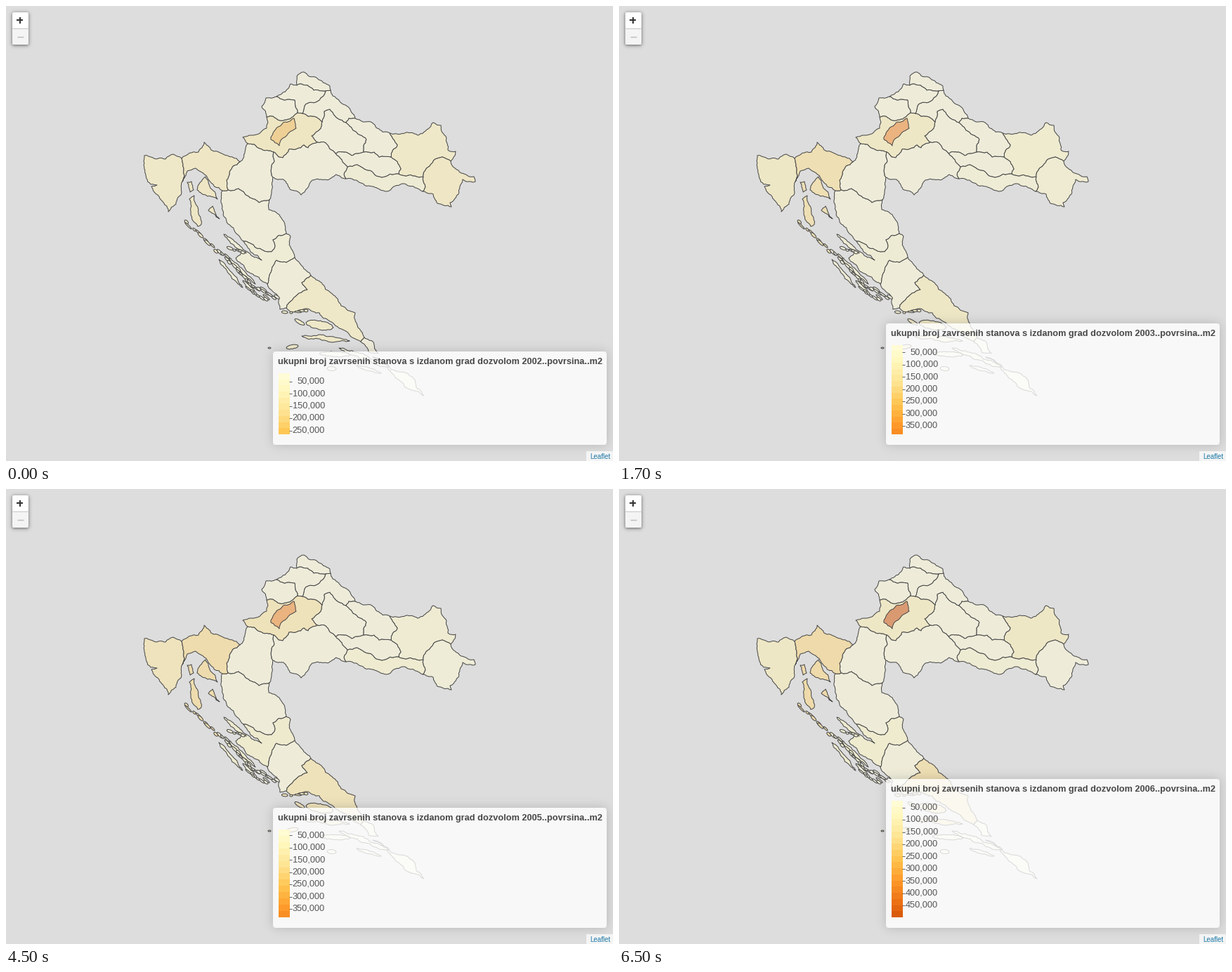
These frames come from a looping animation (864x648 px, 8 s). A matplotlib script:

```python
import random
import numpy as np
import matplotlib.pyplot as plt
from matplotlib.animation import FuncAnimation
from matplotlib.colors import to_rgb
from matplotlib.patches import FancyBboxPatch, Polygon, Rectangle

W, H = 864, 648
GREY = np.array(to_rgb("#dddddd"))
RAMP = np.array([to_rgb(c) for c in (
    "#ffffe5", "#fff7bc", "#fee391", "#fec44f", "#fe9929",
    "#ec7014", "#cc4c02", "#993404", "#662506")])
BAR_BOTTOM, STEP = 610, 17.42           # STEP is pixels per 50 thousand

# thousands of square metres, 2002 to 2006; all other counties stay near USUAL
LOWEST = (17, 21, 27, 27, 24)
HIGHEST = (267, 386, 328, 386, 500)
USUAL = (35,) * 5
VALUES = {
    "City": HIGHEST,
    "Istria": (105, 118, 118, 150, 118),
    "Primorje": (122, 182, 185, 200, 210),
    "County": (125, 112, 98, 157, 112),
    "Split": (105, 115, 185, 157, 185),
    "Osijek": (105, 75, 85, 65, 112),
    "Vukovar": (120, 65, 45, 45, 36),
    "Zadar": (50, 55, 72, 82, 75),
    "Brod": (55, 50, 70, 68, 60),
}
borders, shapes = [], []


def ramp(value):
    steps = np.arange(len(RAMP))
    return np.array([np.interp(value / 87.5, steps, RAMP[:, k]) for k in range(3)])


def split(a, b, rng):
    """Midpoint displacement; returns the points after a, up to b."""
    dx, dy = b[0] - a[0], b[1] - a[1]
    if np.hypot(dx, dy) < 3.5:
        return [b]
    off = rng.uniform(-0.13, 0.13)
    mid = ((a[0] + b[0]) / 2 - dy * off, (a[1] + b[1]) / 2 + dx * off)
    return split(a, mid, rng) + split(mid, b, rng)


def jagged(points):
    rng = random.Random(int(points[0][0] * 7 + points[-1][1]))
    line = [points[0]]
    for a, b in zip(points, points[1:]):
        line += split(a, b, rng)
    return line


def pairs(xy):
    return list(zip(xy[::2], xy[1::2]))


def border(names, *xy):
    borders.append((names.split(), jagged(pairs(xy))))


def island(name, *xy):
    points = pairs(xy)
    shapes.append((name, jagged(points + points[:1])))


def spindle(name, start, end, width):
    """A long island that tapers towards both ends."""
    a, b = np.array(start, float), np.array(end, float)
    side = np.array([a[1] - b[1], b[0] - a[0]]) / np.hypot(*(b - a)) * width / 2
    turn = np.linspace(0, 2 * np.pi, 12, endpoint=False)
    points = [tuple((a + b) / 2 - (b - a) / 2 * np.cos(t) + side * np.sin(t)) for t in turn]
    shapes.append((name, jagged(points + points[:1])))


def islets(name, start, end, count, slope):
    """Small islands scattered along a line."""
    rng = random.Random(count)
    for t in np.linspace(0, 1, count):
        x = start[0] + (end[0] - start[0]) * t + rng.uniform(-3, 3)
        y = start[1] + (end[1] - start[1]) * t + rng.uniform(-2, 2)
        half = rng.uniform(2, 5)
        spindle(name, (x - half, y - half * slope), (x + half, y + half * slope), rng.uniform(2, 4))


def outline(name):
    """Join the borders of a county end to end."""
    left = [line for names, line in borders if name in names]
    ring = list(left.pop(0))

    def gap(p):
        return np.hypot(p[0] - ring[-1][0], p[1] - ring[-1][1])

    while left:
        line = min(left, key=lambda l: min(gap(l[0]), gap(l[-1])))
        left.remove(line)
        ring += line if gap(line[0]) <= gap(line[-1]) else line[::-1]
    return ring


# north: each border names the counties that share it
border("Medjimurje", 414, 113, 414, 100, 424, 94, 443, 103, 461, 114, 462, 120)
border("Medjimurje Koprivnica", 462, 120, 455, 121)
border("Medjimurje Varazdin", 455, 121, 438, 120, 418, 111, 414, 113)
border("Varazdin", 414, 113, 405, 111, 385, 129)
border("Varazdin Krapina", 385, 129, 396, 134, 411, 134, 415, 152)
border("Varazdin County", 415, 152, 422, 153)
border("Varazdin Koprivnica", 422, 153, 425, 142, 446, 134, 455, 121)
border("Krapina", 385, 129, 370, 131, 364, 143, 371, 158)
border("Krapina County", 371, 158, 380, 157, 390, 163, 408, 158, 415, 152)
border("County", 371, 158, 371, 174, 349, 184, 337, 187, 344, 196)
border("County Karlovac", 344, 196, 353, 197, 361, 203, 381, 208)
border("County Sisak", 381, 208, 388, 215, 394, 216, 403, 204, 424, 198, 430, 202, 443, 194)
border("County Bjelovar", 443, 194, 435, 185, 444, 178, 450, 165)
border("County Koprivnica", 422, 153, 438, 157, 450, 165)
border("Koprivnica", 462, 120, 465, 128, 486, 143, 497, 160)
border("Koprivnica Bjelovar", 450, 165, 453, 150, 461, 147, 472, 160, 484, 166)
border("Koprivnica Virovitica", 484, 166, 488, 160, 497, 160)

# east
border("Virovitica", 497, 160, 521, 166, 528, 174, 546, 181)
border("Virovitica Osijek", 546, 181, 557, 198, 548, 215)
border("Virovitica Pozega", 548, 215, 531, 215, 524, 208, 509, 208)
border("Virovitica Bjelovar", 484, 166, 494, 177, 513, 190, 509, 208)
border("Bjelovar Pozega", 509, 208, 492, 213, 483, 208, 469, 210)
border("Bjelovar Sisak", 443, 194, 455, 195, 469, 210)
border("Sisak Pozega", 469, 210, 478, 219, 486, 229)
border("Pozega Brod", 486, 229, 500, 226, 516, 234, 535, 244, 559, 239)
border("Sisak Brod", 486, 229, 481, 240, 484, 246)
border("Pozega Osijek", 548, 215, 562, 232, 559, 239)
border("Brod Osijek", 559, 239, 570, 242, 594, 243)
border("Osijek", 546, 181, 586, 184, 598, 177, 608, 166, 619, 170, 627, 188, 629, 205,
       640, 207, 633, 221)
border("Osijek Vukovar", 633, 221, 621, 215, 600, 230, 594, 243)
border("Vukovar", 633, 221, 648, 238, 666, 243, 668, 250, 650, 247, 644, 268, 632, 280,
       634, 286, 614, 281, 608, 268, 593, 264)
border("Vukovar Brod", 593, 264, 597, 258, 594, 243)
border("Brod", 593, 264, 580, 257, 566, 253, 552, 257, 541, 264, 512, 256, 484, 246)
border("Sisak", 484, 246, 470, 240, 463, 245, 436, 248, 420, 269, 404, 261, 395, 247, 380, 244)

# west
border("Sisak Karlovac", 381, 208, 382, 221, 378, 230, 380, 244)
border("Karlovac", 380, 244, 378, 265, 375, 276)
border("Karlovac", 344, 196, 340, 208, 333, 222)
border("Karlovac Primorje", 333, 222, 318, 237, 314, 248, 316, 262)
border("Karlovac Lika", 316, 262, 331, 260, 343, 270, 360, 280, 375, 276)
border("Primorje", 333, 222, 309, 211, 292, 205, 282, 194, 274, 208, 250, 217)
border("Istria", 250, 217, 238, 211, 227, 218, 197, 213, 206, 254, 215, 255, 207, 257,
       214, 268, 231, 293, 249, 269, 251, 250)
border("Istria Primorje", 251, 250, 253, 232, 250, 217)
border("Primorje", 251, 250, 258, 235, 270, 231, 288, 247, 308, 263)
border("Primorje Lika", 308, 263, 316, 262)

# south
border("Lika", 308, 263, 306, 280, 309, 297, 338, 335)
border("Lika Zadar", 338, 335, 352, 340, 378, 350, 383, 341, 380, 333, 399, 324)
border("Lika", 375, 276, 374, 290, 392, 302, 399, 324)
border("Zadar", 399, 324, 405, 328, 411, 358)
border("Zadar Sibenik", 411, 358, 399, 365, 385, 362, 378, 376, 372, 396)
border("Zadar", 338, 335, 364, 362, 338, 348, 327, 359, 347, 380, 372, 396)
border("Sibenik", 411, 358, 421, 370, 434, 384)
border("Sibenik Split", 434, 384, 421, 394, 429, 404, 408, 418, 399, 430)
border("Sibenik", 372, 396, 388, 416, 390, 432, 399, 430)
border("Split", 434, 384, 449, 394, 477, 427, 497, 437, 497, 447, 510, 472)
border("Split Dubrovnik", 510, 472, 505, 478)
border("Split", 399, 430, 405, 436, 428, 431, 461, 449, 505, 478)
border("Dubrovnik", 510, 472, 523, 479, 530, 495, 516, 493, 505, 478)

counties = {name for names, _ in borders for name in names}
for county in sorted(counties):
    shapes.append((county, outline(county)))
island("City", 377, 190, 380, 181, 397, 165, 410, 160, 413, 174, 392, 190, 389, 199)

island("Primorje", 272, 262, 284, 243, 290, 257, 301, 275, 287, 271)
island("Primorje", 258, 251, 264, 250, 267, 262, 262, 265)
island("Primorje", 261, 275, 268, 270, 274, 296, 278, 311, 273, 314, 263, 295)
island("Primorje", 288, 291, 294, 285, 304, 303, 296, 296)
island("Dubrovnik", 522, 500, 548, 518, 582, 532, 595, 555, 560, 533)
spindle("Zadar", (310, 325), (342, 352), 5)
spindle("Zadar", (303, 361), (337, 401), 4)
spindle("Zadar", (317, 358), (355, 396), 4)
spindle("Sibenik", (337, 391), (358, 413), 4)
spindle("Split", (427, 451), (466, 458), 13)
spindle("Split", (411, 446), (425, 454), 5)
spindle("Split", (421, 470), (489, 477), 6)
spindle("Split", (399, 487), (416, 484), 6)
spindle("Dubrovnik", (474, 487), (545, 514), 7)
spindle("Dubrovnik", (446, 495), (490, 497), 7)
spindle("Dubrovnik", (499, 512), (534, 523), 4)
spindle("Dubrovnik", (457, 516), (470, 517), 6)
islets("Primorje", (257, 308), (300, 348), 9, 1)
islets("Zadar", (306, 350), (350, 398), 13, 1)
islets("Zadar", (318, 344), (340, 352), 5, 0.4)
islets("Sibenik", (352, 400), (386, 416), 10, 0.7)
islets("Sibenik", (346, 404), (372, 419), 7, 0.8)
islets("Split", (396, 435), (430, 435), 5, 0.1)
spindle("Split", (373, 487), (377, 487), 2)

fig = plt.figure(figsize=(W / 72, H / 72), dpi=72, facecolor=GREY)
ax = fig.add_axes([0, 0, 1, 1])
ax.axis("off")
land = [(name, ax.add_patch(Polygon(points, ec="#474747", lw=1, joinstyle="round", zorder=1)))
        for name, points in shapes]


def label(x, y, text, size, color, **kw):
    return ax.text(x, y, text, fontsize=size, color=color, family="Liberation Sans", zorder=6, **kw)


def shadow(x, y, w, h, blur, alpha, dy=0):
    """Soft shadow that shows only outside its box."""
    def soft(n, a, b):
        p, k = np.arange(n) + 0.5, 3.4 / blur
        return 1 / (1 + np.exp(-k * (p - a))) - 1 / (1 + np.exp(-k * (p - b)))
    rgba = np.zeros((H, W, 4))
    rgba[..., 3] = alpha * np.outer(soft(H, y + dy, y + dy + h), soft(W, x, x + w))
    rgba[y:y + h, x:x + w, 3] = 0
    image = ax.imshow(rgba, extent=(0, W, H, 0), aspect="auto", interpolation="nearest", zorder=3)
    ax.set(xlim=(0, W), ylim=(H, 0))
    return image


def box(x, y, w, h, radius, color, alpha=1):
    return ax.add_patch(FancyBboxPatch((x, y), w, h, boxstyle=f"round,pad=0,rounding_size={radius}",
                                       fc=color, ec="none", alpha=alpha, zorder=4))


def stroke(xs, ys, color, width):
    return ax.plot(xs, ys, color=color, lw=width, solid_capstyle="butt", zorder=5)


# zoom buttons and credit
shadow(9, 9, 23, 46, 5, 0.6, 1)
box(9, 9, 23, 46, 4, "#f4f4f4")
box(9, 9, 23, 22, 4, "white")
stroke([9, 32], [31.5, 31.5], "#cccccc", 1)
stroke([15, 24], [20, 20], "#333333", 2)
stroke([19.5, 19.5], [15.5, 24.5], "#333333", 2)
stroke([15.5, 24.5], [43.5, 43.5], "#bbbbbb", 1.4)
ax.add_patch(Rectangle((826, 634), 38, 14, fc="white", alpha=0.7, zorder=4))
label(831, 645, "Leaflet", 9.8, "#1f7aa8")

legend = []


def draw_legend(year):
    low, high = LOWEST[year], HIGHEST[year]

    def level(value):
        return BAR_BOTTOM - (high - value) / 50 * STEP

    top = round(level(low)) - 31
    legend.extend([shadow(380, top, 475, 625 - top, 15, 0.18),
                   box(380, top, 475, 625 - top, 5, "white", 0.8)])
    title = f"ukupni broj zavrsenih stanova s izdanom grad dozvolom {2002 + year}..povrsina..m2"
    legend.append(label(387.3, top + 18, title, 12.7, "#484848", weight="bold"))

    edges = np.linspace(low, high, round((high - low) / 25) + 1)
    for a, b in zip(edges, edges[1:]):
        y0, y1 = round(level(a)), round(level(b))
        legend.append(ax.add_patch(Rectangle((387.5, y0), 16, y1 - y0, fc=ramp((a + b) / 2),
                                             lw=0, zorder=5)))
    for value in range(50, high, 50):
        y = level(value)
        legend.extend(stroke([403, 407], [int(y) + 0.5] * 2, "#666666", 1))
        legend.append(label(454, y + 3.3, f"{value * 1000:,}", 12.72, "#555555", ha="right"))


def update(frame):
    year = (frame + 3) // 4
    for artist in legend:
        artist.remove()
    legend.clear()
    for name, patch in land:
        patch.set_facecolor((GREY + ramp(VALUES.get(name, USUAL)[year])) / 2)
    # the highest value ends at 500, so its own label is left off by the range
    draw_legend(year)
    return []


anim = FuncAnimation(fig, update, frames=16, init_func=lambda: update(0), interval=500, repeat=True)
plt.show()
```
